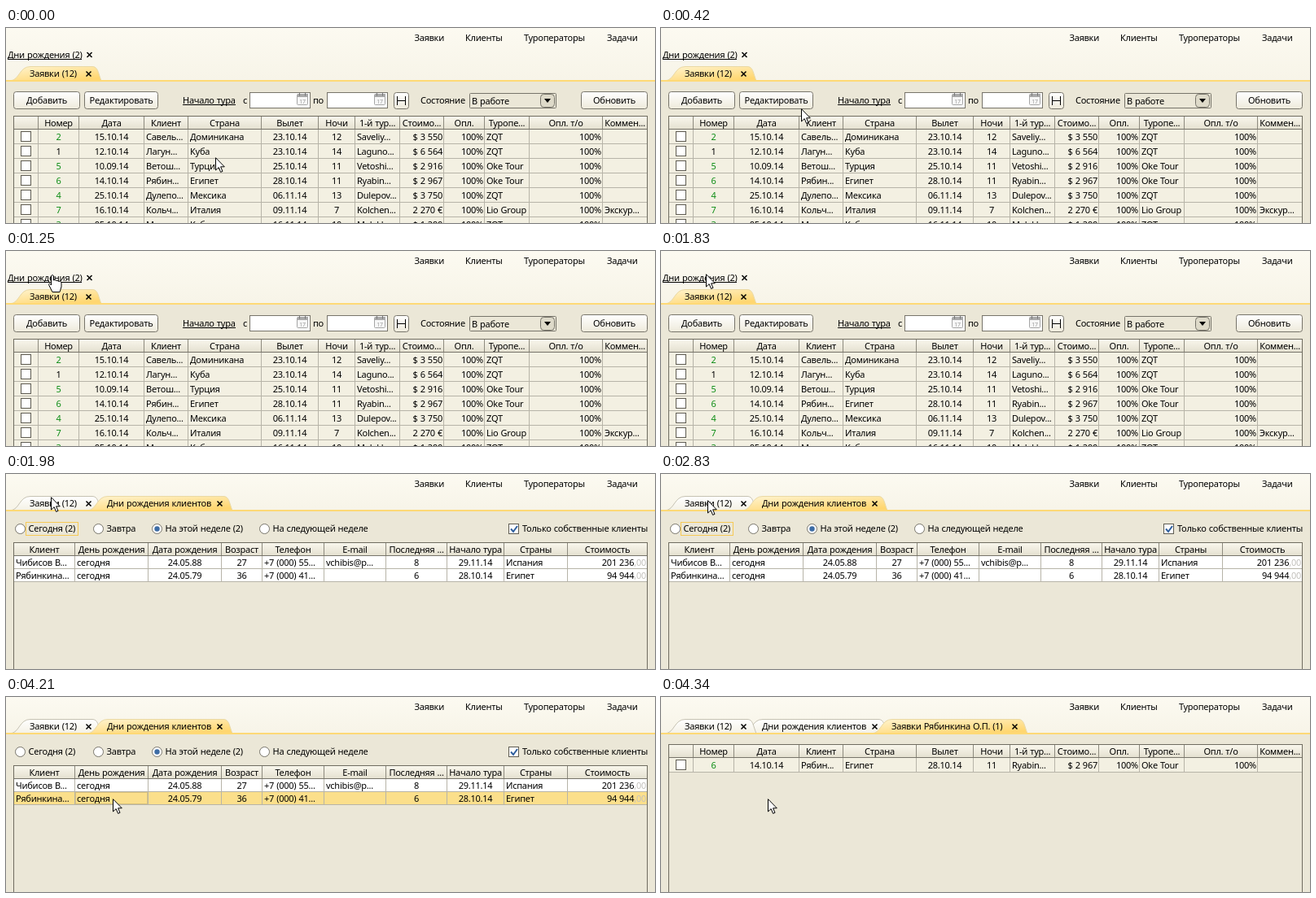
Animation of 797 by 240 pixels, one loop 7970 ms. Source, as an HTML page:

```html
<!DOCTYPE html>
<html lang="ru">
<head>
<meta charset="utf-8">
<title>Дни рождения клиентов</title>
<style>
  html, body { margin: 0; width: 100%; height: 100%; overflow: hidden; background: #ebe7d7; }
  svg { display: block; width: 797px; height: 240px; }
  text { font: 11px "Noto Sans", "Open Sans", sans-serif; letter-spacing: -.25px; word-spacing: .5px; white-space: pre; }
  .screen, .toggle, .cursor { animation: 7970ms step-end infinite; }
  .sharp { shape-rendering: crispEdges; }
</style>
</head>
<body>
<svg id="stage" viewBox="0 0 797 240">
  <defs>
    <linearGradient id="top" x2="0" y2="1"><stop stop-color="#fcfaf1"/><stop offset="1" stop-color="#f7f4e8"/></linearGradient>
    <linearGradient id="button" x2="0" y2="1"><stop stop-color="#fff"/><stop offset="1" stop-color="#eeeadb"/></linearGradient>
    <linearGradient id="head" x2="0" y2="1"><stop stop-color="#faf8ee"/><stop offset="1" stop-color="#e5e1d1"/></linearGradient>
    <linearGradient id="active" x2=".7" y2="1"><stop stop-color="#fff4d0"/><stop offset="1" stop-color="#ffd670"/></linearGradient>
    <linearGradient id="idle" x2="0" y2="1"><stop stop-color="#fff"/><stop offset="1" stop-color="#f4f1e5"/></linearGradient>
  </defs>
</svg>
<script>
const LOOP = 7970;
const RIGHT = 787;
const INK = '#000';
const BORDER = '#77746a';

// Basic shapes
const rect = (x, y, w, h, fill, stroke = 'none', r = 0) =>
  `<rect x="${x}" y="${y}" width="${w}" height="${h}" rx="${r}" fill="${fill}" stroke="${stroke}"/>`;
const path = (d, stroke, fill = 'none', width = 1) =>
  `<path d="${d}" stroke="${stroke}" fill="${fill}" stroke-width="${width}"/>`;
const line = (d, color) => `<path class="sharp" d="${d}" stroke="${color}" fill="none"/>`;
const label = (x, mid, str, anchor = 'start', fill = INK) =>
  `<text x="${x}" y="${mid + 4}" text-anchor="${anchor}" fill="${fill}">${str}</text>`;
const group = (cls, id, body) => `<g class="${cls}" id="${id}">${body}</g>`;

// Widgets
const cross = (x, y) => path(`M${x - 3} ${y - 3}l6 6m0 -6l-6 6`, INK, 'none', 1.5);
const button = (x, w, str) =>
  rect(x + .5, 78.5, w, 21, 'url(#button)', BORDER, 3) + label(x + w / 2 + .5, 89, str, 'middle');
const dateField = x =>
  rect(x + .5, 79.5, 74, 19, '#fff', BORDER) +
  rect(x + 58.5, 81.5, 13, 13, '#f7f7f7', '#a5a5a5', 1) + rect(x + 59, 81, 13, 4, '#a9a9a9') +
  path(`M${x + 61.5} 79.5v4m7 -4v4`, '#777') +
  `<text x="${x + 65}" y="93" text-anchor="middle" fill="#999" style="font-size:7px">17</text>`;
const radio = (x, str, on) =>
  `<circle cx="${x}" cy="67.5" r="6" fill="#fff" stroke="${BORDER}"/>` +
  (on ? '<circle cx="' + x + '" cy="67.5" r="3.2" fill="#3d6ca5"/>' : '') + label(x + 10, 67, str);
const checkbox = (x, y) => rect(x + .5, y + .5, 12, 12, '#fff', '#5f5c52');

function tab(x, right, y, str, active) {
  const d = `M${x} ${y + 18}C${x + 12} ${y + 17} ${x + 11} ${y + .5} ${x + 25} ${y + .5}H${right - 11}` +
    `C${right - 4} ${y + .5} ${right - 4} ${y + 8} ${right} ${y + 18}`;
  return path(d, active ? '#ead9a4' : '#c6c2b2', `url(#${active ? 'active' : 'idle'})`) +
    label(x + 24, y + 9, str) + cross(right - 15.5, y + 9.5);
}

const menu = [[501.5, 'Заявки'], [564, 'Клиенты'], [636, 'Туроператоры'], [738, 'Задачи']]
  .map(([x, str]) => label(x, 12, str)).join('');
const backdrop = edge => rect(0, 0, 797, 240, '#ebe7d7') + rect(0, 0, 797, edge, 'url(#top)') + menu;
const tabLine = y => rect(0, y, 797, 2, '#ffd976');

// Columns are [left edge, title, alignment]; a cell is a string or {check}, {green}, {cents}.
function cellText(cell, left, right, align, mid) {
  if (cell.check) return checkbox(left + 9, mid - 7);
  const x = { l: left + 3, c: (left + right) / 2 + .5, r: right - 1 }[align];
  const anchor = { l: 'start', c: 'middle', r: 'end' }[align];
  if (cell.green) return label(x, mid, cell.green, anchor, '#0c8c14');
  if (cell.cents) return label(x, mid, `${cell.cents}<tspan fill="#c3c1bc">,00</tspan>`, anchor);
  return label(x, mid, cell, anchor);
}

function table(y, rowH, columns, rows, fill, underlay = '') {
  const rightOf = i => i + 1 < columns.length ? columns[i + 1][0] : RIGHT;
  const bodyTop = y + 16, bottom = bodyTop + rows.length * rowH;
  let out = rect(9, bodyTop, 778, bottom - bodyTop, fill) + rect(9, y, 778, 16, 'url(#head)') + underlay;
  rows.forEach((_, i) => out += line(`M9 ${bodyTop + (i + 1) * rowH + .5}H${RIGHT}`, '#b7b4a8'));
  columns.forEach(([x, title], i) => {
    if (i) out += line(`M${x + .5} ${y}V${bottom}`, '#b7b4a8') + line(`M${x + .5} ${y}V${bodyTop}`, '#8d8a7e');
    out += label((x + rightOf(i)) / 2 + .5, y + 9, title, 'middle');
  });
  out += line(`M9 ${bodyTop + .5}H${RIGHT}`, BORDER);
  rows.forEach((row, r) => row.forEach((cell, i) =>
    out += cellText(cell, columns[i][0], rightOf(i), columns[i][2], bodyTop + r * rowH + rowH / 2 + 1)));
  return out + `<rect class="sharp" x="9.5" y="${y + .5}" width="778" height="250" fill="none" stroke="#6f6c60"/>`;
}

// Orders
const orderColumns = [
  [9, '', 'c'], [39, 'Номер', 'c'], [89, 'Дата', 'c'], [169, 'Клиент', 'l'], [223, 'Страна', 'l'],
  [313, 'Вылет', 'c'], [383, 'Ночи', 'c'], [428, '1-й тур...', 'l'], [483, 'Стоимо...', 'r'],
  [537, 'Опл.', 'r'], [587, 'Туропе...', 'l'], [642, 'Опл. т/о', 'r'], [732, 'Коммен...', 'l']];
const order = (num, date, client, country, flight, nights, tourist, cost, agency, note = '') =>
  [{ check: true }, num === '1' ? num : { green: num }, date, client, country, flight, nights,
    tourist, cost, '100%', agency, '100%', note];
const orders = [
  order('2', '15.10.14', 'Савель...', 'Доминикана', '23.10.14', '12', 'Saveliy...', '$ 3 550', 'ZQT'),
  order('1', '12.10.14', 'Лагун...', 'Куба', '23.10.14', '14', 'Laguno...', '$ 6 564', 'ZQT'),
  order('5', '10.09.14', 'Ветош...', 'Турция', '25.10.14', '11', 'Vetoshi...', '$ 2 916', 'Oke Tour'),
  order('6', '14.10.14', 'Рябин...', 'Египет', '28.10.14', '11', 'Ryabin...', '$ 2 967', 'Oke Tour'),
  order('4', '25.10.14', 'Дулепо...', 'Мексика', '06.11.14', '13', 'Dulepov...', '$ 3 750', 'ZQT'),
  order('7', '16.10.14', 'Кольч...', 'Италия', '09.11.14', '7', 'Kolchen...', '2 270 €', 'Lio Group', 'Экскур...'),
  order('3', '05.10.14', 'Мелех...', 'Куба', '16.11.14', '10', 'Melekh...', '$ 1 290', 'ZQT')];

const ordersScreen = backdrop(64) +
  label(2, 33, 'Дни рождения (2)') + line('M2 38.5H93', INK) + cross(102.5, 33) +
  tab(5, 117, 47, 'Заявки (12)', true) + tabLine(64) +
  button(9, 81, 'Добавить') + button(96, 90, 'Редактировать') +
  label(217, 89, 'Начало тура') + line('M217 94.5H282', INK) + label(291, 89, 'с') + dateField(299) +
  label(377, 89, 'по') + dateField(394) +
  rect(476.5, 79.5, 18, 20, 'url(#button)', BORDER, 3) + path('M480.5 84v11M490.5 84v11M481 89.5h9', INK) +
  label(509, 89, 'Состояние') +
  rect(569.5, 80.5, 106, 18, '#ebe7d7', BORDER, 1) + label(572, 90, 'В работе') +
  rect(656.5, 81.5, 17, 16, '#dedac9', BORDER, 4) + path('M661 87h8l-4 5z', 'none', INK) +
  button(706, 81, 'Обновить') +
  table(108, 18, orderColumns, orders, '#f3f0e2');

// Birthdays
const birthdayColumns = [
  [9, 'Клиент', 'l'], [84, 'День рождения', 'l'], [174, 'Дата рождения', 'c'], [264, 'Возраст', 'c'],
  [314, 'Телефон', 'l'], [390, 'E-mail', 'l'], [466, 'Последняя ...', 'c'], [541, 'Начало тура', 'c'],
  [611, 'Страны', 'l'], [689, 'Стоимость', 'r']];
const birthdays = [
  ['Чибисов В...', 'сегодня', '24.05.88', '27', '+7 (000) 55...', 'vchibis@p...', '8', '29.11.14', 'Испания', { cents: '201 236' }],
  ['Рябинкина...', 'сегодня', '24.05.79', '36', '+7 (000) 41...', '', '6', '28.10.14', 'Египет', { cents: '94 944' }]];
const selectedRow = group('toggle', 'selected',
  rect(10, 117, 777, 15, '#fbdf8b') + rect(85.5, 117.5, 88, 14, 'none', '#d9c27c'));

const birthdaysScreen = backdrop(45) +
  tab(5, 117, 27, 'Заявки (12)') + tab(100, 278, 27, 'Дни рождения клиентов', true) + tabLine(44) +
  radio(17.5, 'Сегодня (2)') + radio(113.5, 'Завтра') +
  radio(185.5, 'На этой неделе (2)', true) + radio(317.5, 'На следующей неделе') +
  checkbox(617, 61) + path('M620 67.5l3 3.5l5 -7', '#2f5f9e', 'none', 2) + label(634, 67, 'Только собственные клиенты') +
  group('toggle', 'focus', rect(24.5, 59.5, 64, 16, 'none', '#f6c955')) +
  table(84, 16, birthdayColumns, birthdays, '#fff', selectedRow);

// Orders of one client
const clientScreen = backdrop(45) +
  tab(100, 278, 27, 'Дни рождения клиентов') + tab(5, 117, 27, 'Заявки (12)') +
  tab(259, 450, 27, 'Заявки Рябинкина О.П. (1)', true) + tabLine(44) +
  table(58, 18, orderColumns, [orders[3]], '#f3f0e2');

// Pointers, drawn with the hot spot at 0,0
const arrow = path('M.5 .7V16L4.2 12.6L6.6 18.4L9 17.4L6.6 11.8H11.3Z', INK, '#fff');
const hand = path('M-1.5 13V1.5Q0 -.5 1.5 1.5V7Q3 5.5 4.5 7.5Q6 6.5 7.5 8.5Q9 7 11 9.5V15L9 21.5H0L-4.5 12.5Q-4 9.5 -1.5 13Z', INK, '#fff');
const ring = '<circle r="7" fill="none" stroke="#58b5dc" stroke-width="4"/>' +
  path('M0 -7A7 7 0 0 1 7 0', '#c6ecf8', 'none', 3);

document.getElementById('stage').innerHTML +=
  group('screen', 'orders', ordersScreen) + group('screen', 'birthdays', birthdaysScreen) +
  group('screen', 'client', clientScreen) +
  group('cursor', 'pointer', group('toggle', 'arrow', arrow) + group('toggle', 'hand', hand) + group('toggle', 'ring', ring));

// Timing: every change is a hard step
const css = [];
const percent = ms => (ms / LOOP * 100).toFixed(4) + '%';
function keyframes(id, frames) {
  css.push(`@keyframes ${id}{${frames.map(([ms, rule]) => `${percent(ms)}{${rule}}`).join('')}}#${id}{animation-name:${id}}`);
}
function show(id, from, to) {
  const frames = [[0, `opacity:${from ? 0 : 1}`]];
  if (from) frames.push([from, 'opacity:1']);
  if (to < LOOP) frames.push([to, 'opacity:0']);
  keyframes(id, frames);
}
show('orders', 0, 1980);
show('birthdays', 1980, 4340);
show('client', 4340, LOOP);
show('focus', 0, 3940);
show('selected', 3940, LOOP);
show('hand', 1100, 1700);
show('ring', 1700, 1830);
keyframes('arrow', [[0, 'opacity:1'], [1100, 'opacity:0'], [1830, 'opacity:1']]);
keyframes('pointer', [
  [0, 257, 159], [130, 256, 158], [280, 217, 134], [420, 172, 99], [550, 136, 77], [680, 114, 63],
  [830, 84, 45], [970, 72, 41], [1100, 65, 36], [1250, 57, 29], [1390, 55, 28], [2830, 57, 32],
  [2980, 91, 81], [3130, 114, 112], [3270, 126, 121], [3400, 130, 125], [3540, 131, 125]
].map(([ms, x, y]) => [ms, `transform:translate(${x}px,${y}px)`]));
document.head.appendChild(document.createElement('style')).textContent = css.join('\n');
</script>
</body>
</html>
```
